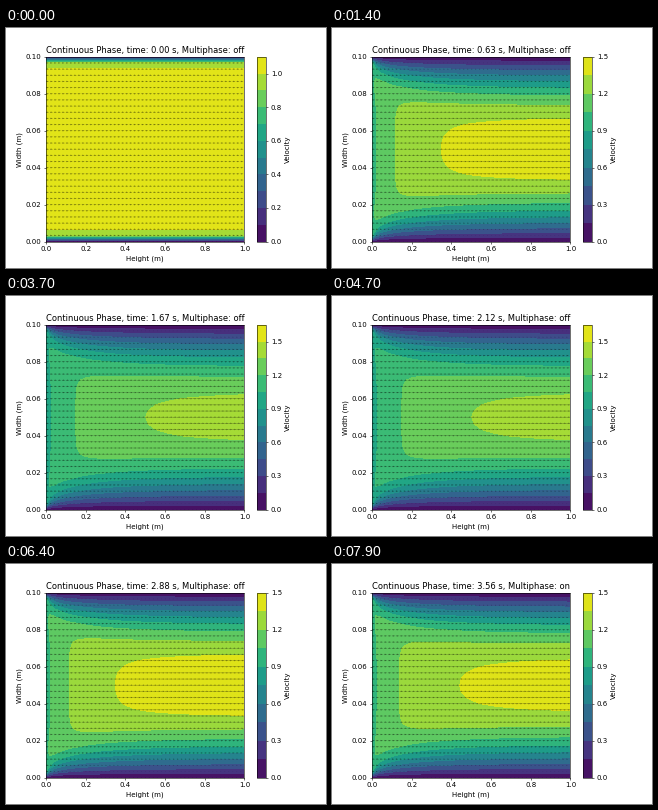
A matplotlib script that plays this animation: 320 px wide and 240 px high, repeating every 8 s.

```python
import numpy as np
import matplotlib.pyplot as plt
from matplotlib.animation import FuncAnimation

FRAMES, INTERVAL = 80, 100
DT, STEPS = 0.005, 9   # solver step, steps per frame
H = 0.1
PULSE = 10             # frames per inlet pulsation
TROUGH = 7.35          # phase of the slowest flow
START = 0.0008         # initial boundary layer age

x = np.linspace(0, 1, 51)
y = np.linspace(0, H, 31)
X, Y = np.meshgrid(x, y)
S = 2 * Y / H - 1

# Eigenvalues of tan(a) = a for developing channel flow
q = (np.arange(1, 41) + 0.5) * np.pi
ALPHA = q - 1 / q - 2 / (3 * q**3)
MODES = [2 / a**2 * (np.cos(a * S) / np.cos(a) - 1) for a in ALPHA]


def pulse(n):
    return np.cos(2 * np.pi * (n - TROUGH) / PULSE)


def velocity(n, t):
    age = np.clip(0.1495 * (1 - np.exp(-X / 0.75)), START, START + 0.23 * t)
    u = 1.5 * (1 - S**2)
    for a, mode in zip(ALPHA, MODES):
        u = u + mode * np.exp(-a**2 * age)
    u -= min(1, t / 0.3) * 4 * X * np.exp(-X / 0.025) * (1 - S**2)
    swing = 0.006 - 0.026 * pulse(n)
    u *= 1 + swing * (1 - np.exp(-X / 0.15))
    u *= 1 - 0.03 * np.exp(-t / 0.05)
    u[[0, -1]] = 0
    return np.maximum(u, 0)


def contour_levels(u, n):
    peak = u.max()
    step = 0.1 if peak < 1.1 else 0.15
    count = int(np.ceil(peak / step))
    if step == 0.15:
        count = min(count, 10)
    if n > 10 and pulse(n) > 0.8:
        count = 11
    return step * np.arange(count + 1)


fig = plt.figure(figsize=(6.4, 4.8), dpi=50)
ax = fig.add_axes([0.125, 0.11, 0.62, 0.77])
cax = fig.add_axes([0.78375, 0.11, 0.028875, 0.77])


def draw(n):
    ax.cla()
    cax.cla()
    t = STEPS * n * DT
    u = velocity(n, t)
    levels = contour_levels(u, n)
    filled = ax.contourf(X, Y, np.minimum(u, levels[-1] - 1e-6), levels=levels)
    ax.quiver(X, Y, u, np.zeros_like(u), alpha=0.5)
    ax.set(xlim=(0, 1), ylim=(0, H), xlabel="Height (m)", ylabel="Width (m)")
    state = "on" if t > 3 else "off"
    ax.set_title(f"Continuous Phase, time: {t:.2f} s, Multiphase: {state}")
    fig.colorbar(filled, cax=cax, label="Velocity")
    return []


anim = FuncAnimation(fig, draw, frames=FRAMES, interval=INTERVAL,
                     init_func=lambda: [], repeat=True, repeat_delay=0)
plt.show()
```
